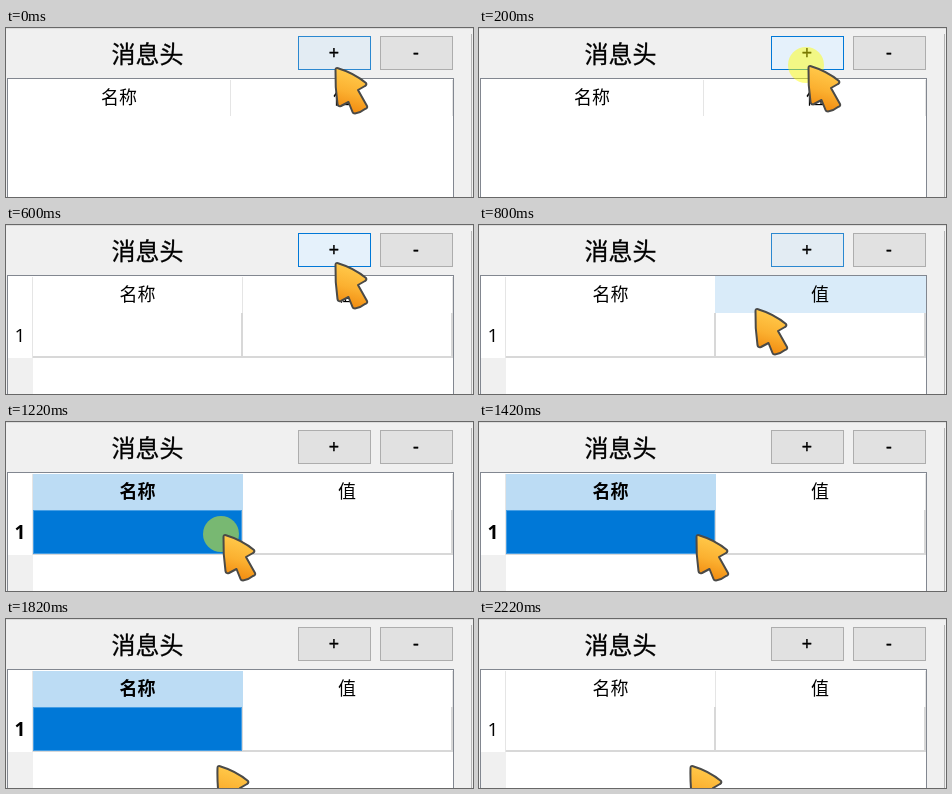
Animation, 467 px wide and 169 px high, one loop 2830 ms. Source, as an HTML page with a canvas:

```html
<!DOCTYPE html>
<html lang="zh">
<head>
<meta charset="utf-8">
<style>
  html, body { margin: 0; width: 100%; height: 100%; overflow: hidden; background: #f0f0f0; }
  canvas { display: block; }
</style>
</head>
<body>
<canvas id="stage" width="467" height="169"></canvas>
<script>
const ctx = document.getElementById('stage').getContext('2d');
const LOOP = 2830;
const FONT = '"Noto Sans CJK SC", "Noto Sans CJK", sans-serif';
const LATIN = '"Open Sans", "Noto Sans", sans-serif';

// Each step overrides the state left by the one before it.
const steps = [
  { at: 0, cursor: [328, 39], button: 'fading', row: false },
  { at: 200, cursor: [328, 37], button: 'hover', click: true },
  { at: 400, row: true, click: false },
  { at: 800, cursor: [275, 83], button: 'fading', hoverValue: true },
  { at: 1000, cursor: [222, 109], button: 'idle', hoverValue: false },
  { at: 1220, cursor: [216, 112], selected: true, click: true },
  { at: 1420, click: false },
  { at: 1620, cursor: [210, 136] },
  { at: 1820, cursor: [210, 146] },
  { at: 2220, selected: false }
];
const buttonColors = {
  idle: ['#e1e1e1', '#adadad'],
  fading: ['#e3ecf3', '#2b88d0'],
  hover: ['#e5f1fb', '#0078d7']
};

function box(x, y, w, h, color) {
  ctx.fillStyle = color;
  ctx.fillRect(x, y, w, h);
}

// `weight` thickens the glyphs slightly with an outline.
function text(value, x, baseline, size, { family = FONT, bold = false, weight = 0 } = {}) {
  ctx.font = `${bold ? 'bold ' : ''}${size}px ${family}`;
  ctx.textAlign = 'center';
  ctx.fillStyle = ctx.strokeStyle = '#000';
  ctx.fillText(value, x, baseline);
  if (weight) {
    ctx.lineWidth = weight;
    ctx.strokeText(value, x, baseline);
  }
}

function button(x, label, style) {
  const [fill, border] = buttonColors[style];
  box(x, 8, 73, 34, border);
  box(x + 1, 9, 71, 32, fill);
  text(label, x + 36, 31, 18, { family: LATIN, weight: .4 });
}

function table({ row, selected, hoverValue }) {
  box(1, 50, 447, 130, '#828790');
  box(2, 51, 445, 130, '#fff');
  const split = row ? 236 : 224;
  box(split, 52, 1, 36, '#e5e5e5');
  box(446, 52, 1, 36, '#e5e5e5');
  if (selected) box(27, 52, 210, 36, '#bcdcf4');
  if (hoverValue) box(236, 51, 211, 37, '#d9ebf9');
  text('名称', row ? 131.5 : 113, 76, 18, { bold: selected });
  text('值', row ? 341 : 336, 76, 18);
  if (!row) return;

  box(26, 52, 1, 81, '#e5e5e5');
  box(2, 133, 25, 36, '#f0f0f0');
  box(27, 131, 420, 2, '#d8d8d8');
  box(235, 88, 2, 45, '#d8d8d8');
  box(445, 88, 2, 45, '#d8d8d8');
  text('1', 14, 117, 19, { family: LATIN, bold: selected });
  if (selected) {
    box(27, 88, 209, 44, '#0078d7');
    ctx.strokeStyle = '#8cc4f0';
    ctx.lineWidth = 1;
    ctx.setLineDash([1, 1]);
    ctx.strokeRect(27.5, 88.5, 208, 43);
    ctx.setLineDash([]);
  }
}

function pointer([x, y], click) {
  if (click) {
    ctx.fillStyle = 'rgba(255, 255, 0, .47)';
    ctx.beginPath();
    ctx.arc(x - 1, y, 18, 0, Math.PI * 2);
    ctx.fill();
  }
  ctx.save();
  ctx.translate(x, y);
  const arrow = new Path2D('M1.5 3 Q1.5 .5 4 1.2 Q20 6 32 16 Q33 18 31 19 L24 23 L33 39 Q34 41 31 42 Q26 46 21 46.5 Q19 46.5 18.5 45 L14.5 35 L7 39 Q4 40 3.5 37 Q1 20 1.5 3 Z');
  const fill = ctx.createLinearGradient(22, 8, 12, 44);
  fill.addColorStop(0, '#ffc647');
  fill.addColorStop(.5, '#fbb030');
  fill.addColorStop(1, '#f18b10');
  ctx.lineJoin = 'round';
  ctx.lineWidth = 2;
  ctx.strokeStyle = '#4a4a48';
  ctx.fillStyle = fill;
  ctx.fill(arrow);
  ctx.stroke(arrow);
  ctx.restore();
}

function draw(time) {
  const state = Object.assign({}, ...steps.filter(step => step.at <= time));
  box(0, 0, 467, 169, '#f0f0f0');
  box(0, 0, 467, 1, '#dcdcdc');
  box(465, 6, 1, 163, '#b4b4b4');
  text('消息头', 141.5, 35, 24, { weight: .3 });
  button(292, '+', state.button);
  button(374, '-', 'idle');
  table(state);
  pointer(state.cursor, state.click);
}

function tick() {
  draw(performance.now() % LOOP);
  requestAnimationFrame(tick);
}
tick();
</script>
</body>
</html>
```
